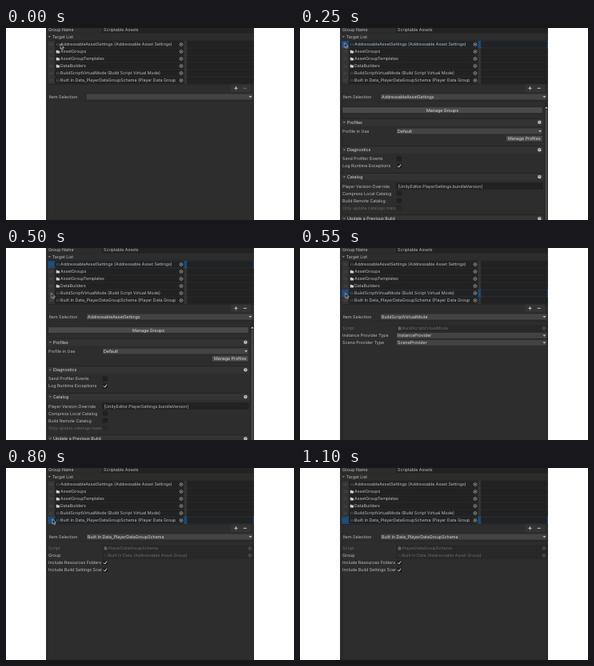
Write an HTML page that moves like this. It is 360 px wide and 240 px high and loops after 1.15 s.

```html
<!DOCTYPE html>
<html lang="en">
<head>
<meta charset="utf-8">
<title>Inspector list selection</title>
<style>
html, body { margin: 0; width: 100%; height: 100%; overflow: hidden; background: #fff; }
svg { display: block; width: 360px; height: 240px; }
text { font: 5.3px Inter, "Liberation Sans", sans-serif; fill: #bebebe; text-rendering: geometricPrecision; white-space: pre; }
.dim { opacity: .42; }
.bright { fill: #dedede; }
.mid { text-anchor: middle; }

.pick, .panel, .minus, .cursor { animation: 1150ms step-end infinite; }
.pick, .panel { visibility: hidden; }
.first { animation-name: first; }
.second { animation-name: second; }
.third { animation-name: third; }
.minus { animation-name: minus; }
.cursor { animation-name: cursor; }

/* 50 ms = 4.348% */
@keyframes first {
  0% { visibility: hidden; }
  21.739% { visibility: visible; }
  47.826%, 100% { visibility: hidden; }
}
@keyframes second {
  0% { visibility: hidden; }
  47.826% { visibility: visible; }
  69.565%, 100% { visibility: hidden; }
}
@keyframes third {
  0% { visibility: hidden; }
  69.565%, 100% { visibility: visible; }
}
@keyframes minus {
  0% { opacity: .45; }
  21.739%, 100% { opacity: 1; }
}
@keyframes cursor {
  0% { transform: translate(68px, 20px); animation-timing-function: steps(2); }
  8.696% { transform: translate(55.6px, 18.4px); }
  26.087% { transform: translate(55.6px, 18.4px); animation-timing-function: steps(4); }
  43.478% { transform: translate(56.6px, 56.4px); }
  52.174% { transform: translate(56.6px, 56.4px); animation-timing-function: steps(3); }
  65.217% { transform: translate(58px, 63.8px); }
  73.913% { transform: translate(58px, 63.8px); visibility: visible; animation-timing-function: steps(5); }
  95.652%, 100% { transform: translate(316px, 20px); visibility: hidden; }
}
</style>
</head>
<body>
<svg id="stage" viewBox="0 0 360 240"></svg>
<script>
const LINE = '#1e1e1e';
const rect = (x, y, w, h, fill, more = '') =>
  `<rect x="${x}" y="${y}" width="${w}" height="${h}" fill="${fill}" ${more}/>`;
const path = (d, fill, more = '') => `<path d="${d}" fill="${fill}" ${more}/>`;
const group = (cls, ...parts) => `<g class="${cls}">${parts.join('')}</g>`;

// Every y below is the vertical centre of a row.
const text = (x, y, s, cls = '', clip = '') =>
  `<text x="${x}" y="${y + 1.9}" class="${cls}" ${clip && `clip-path="url(#${clip})"`}>${s}</text>`;
const label = (y, s, cls) => text(53, y, s, cls, 'labelClip');
const box = (x, y, right, fill = '#222') =>
  rect(x + .25, y - 3.9, right - x - .5, 7.8, fill, `rx=".8" stroke="${LINE}" stroke-width=".5"`);
const arrow = (x, y) => path(`M${x - 2} ${y - 1}h4l-2 2.3z`, '#bbb');
const fold = (x, y) => path(`M${x - 1.7} ${y - 1}h3.4l-1.7 2.2z`, '#777');
const dropdown = (x, y, right, s) =>
  box(x, y, right, '#434343') + text(x + 2, y, s, 'bright') + arrow(right - 3.5, y);
const button = (x, y, right, s) =>
  box(x, y, right, '#4a4a4a') + text((x + right) / 2, y, s, 'mid bright');
const picker = (x, y) =>
  `<circle cx="${x}" cy="${y}" r="2" fill="none" stroke="#aaa" stroke-width=".7"/>` +
  `<circle cx="${x}" cy="${y}" r=".8" fill="#aaa"/>`;
const check = (y, on) =>
  rect(121.2, y - 2.7, 5.6, 5.4, '#202020', `rx=".6" stroke="${LINE}" stroke-width=".5"`) +
  (on ? path(`M122.1 ${y}l1.4 1.6l2.5-3.4`, 'none', 'stroke="#e4e4e4" stroke-width="1"') : '');
const toggle = (y, s, on) => label(y, s) + check(y, on);
const braces = (x, y) =>
  path(`M${x + 1.6} ${y - 1.6}q-.9 0-.7.9t-.6.7q.8 0 .6.7t.7.9m1.2-3.2q.9 0 .7.9t.6.7q-.8 0-.6.7t-.7.9`,
    'none', 'stroke="#808080" stroke-width=".5"');
const folder = (x, y) => path(`M${x} ${y - 1.8}h1.7l.6.7h2v3h-4.3z`, '#d0d0d0');
const page = (x, y) => path(`M${x} ${y - 2.2}h2.6l1.2 1.2v3.2h-3.8z`, '#aaa');
const header = (y, s) =>
  rect(52, y - 4.6, 252, 9, '#333') + rect(52, y - 5, 252, .6, LINE) +
  fold(55.3, y) + text(59, y, s, 'bright') +
  `<circle cx="299.4" cy="${y - .3}" r="2.2" fill="#ccc"/>` +
  path(`M298.6 ${y - .9}q.1-.7.8-.7t.8.7q0 .4-.8.9v.3m0 .5v.4`, 'none', 'stroke="#333" stroke-width=".55"');

const rowY = i => 20.5 + 9 * i;
const items = [
  [braces, 'AddressableAssetSettings (Addressable Asset Settings)', 'first'],
  [folder, 'AssetGroups'],
  [folder, 'AssetGroupTemplates'],
  [folder, 'DataBuilders'],
  [braces, 'BuildScriptVirtualMode (Build Script Virtual Mode)', 'second'],
  [braces, 'Built In Data_PlayerDataGroupSchema (Player Data Group', 'third']
];
const row = ([icon, name, pick], i) => {
  const y = rowY(i);
  return (pick ? rect(52, y - 4.5, 258, 9, '#1d4a7c', `class="pick ${pick}"`) : '') +
    path(`M54 ${y - .8}h5m-5 1.7h5`, 'none', 'stroke="#555" stroke-width=".5"') +
    box(61, y, 222.5) + icon(62.7, y) + text(68, y, name, '', 'rowClip') +
    picker(219, y) + box(226.2, y, 309);
};
const choice = (cls, s) => group('panel ' + cls, text(102, 86, s, 'bright'));
const objectField = (y, icon, s) =>
  group('dim', box(120, y, 309), icon(122.6, y), text(127.5, y, s), picker(305, y));

const list = [
  text(53, 2, 'Group Name'),
  box(120, 1.8, 309), text(122, 2, 'Scriptable Assets'),
  rect(50, 6.2, 260, .5, '#252525'),
  fold(54.3, 11), text(57.8, 11, 'Target List'),
  rect(51.8, 15.5, 257.8, 54.8, '#343434', `stroke="${LINE}" stroke-width=".5"`),
  ...items.map(row),
  rect(281, 70.5, 25, 9.5, '#343434', 'rx="1"'),
  path('M285.2 75.3h4.6m-2.3-2.3v4.6', 'none', 'stroke="#ccc" stroke-width=".9"'),
  path('M296.7 75.3h4.2', 'none', 'class="minus" stroke="#ccc" stroke-width=".9"'),
  text(53.7, 86, 'Item Selection'),
  dropdown(100, 86, 309, ''),
  rect(52.2, 91.5, 257, 160, 'none', 'stroke="#252525" stroke-width=".6"')
];

const settings = group('panel first',
  rect(305, 94, 5, 146, '#282828'),
  path('M306.2 100.4h3.4l-1.7-2.2z', '#ccc'),
  rect(306.6, 102, 2.6, 140, '#484848', 'rx="1.3"'),
  button(52.5, 102.6, 303.5, 'Manage Groups'),
  header(118, 'Profiles'),
  label(129, 'Profile in Use'), dropdown(120, 129, 303.5, 'Default'),
  button(257, 138.2, 303.5, 'Manage Profiles'),
  header(152.5, 'Diagnostics'),
  toggle(163.5, 'Send Profiler Events', false),
  toggle(172.5, 'Log Runtime Exceptions', true),
  header(186.3, 'Catalog'),
  label(197.6, 'Player Version Override'), box(120, 197.6, 303.5),
  text(122.4, 197.6, '[UnityEditor.PlayerSettings.bundleVersion]'),
  toggle(206.6, 'Compress Local Catalog', false),
  toggle(215.6, 'Build Remote Catalog', false),
  group('dim', toggle(224.6, 'Only update catalogs manually', false)),
  header(238.5, 'Update a Previous Build'));

const builder = group('panel second',
  label(100.4, 'Script', 'dim'), objectField(100.4, page, 'BuildScriptVirtualMode'),
  label(109.4, 'Instance Provider Type'), dropdown(120, 109.4, 309, 'InstanceProvider'),
  label(118.4, 'Scene Provider Type'), dropdown(120, 118.4, 309, 'SceneProvider'));

const schema = group('panel third',
  label(100.4, 'Script', 'dim'), objectField(100.4, page, 'PlayerDataGroupSchema'),
  label(109.4, 'Group'), objectField(109.4, braces, 'Built In Data (Addressable Asset Group)'),
  toggle(118.4, 'Include Resources Folders', true),
  toggle(127.5, 'Include Build Settings Scenes', true));

document.getElementById('stage').innerHTML = `
  <defs>
    <clipPath id="view">${rect(50, 0, 260, 240, '#000')}</clipPath>
    <clipPath id="labelClip">${rect(50, 0, 70, 240, '#000')}</clipPath>
    <clipPath id="rowClip">${rect(50, 0, 165.3, 240, '#000')}</clipPath>
  </defs>
  <g clip-path="url(#view)">
    ${rect(50, 0, 260, 240, '#2d2d2d')}
    ${list.join('')}
    ${choice('first', 'AddressableAssetSettings')}
    ${choice('second', 'BuildScriptVirtualMode')}
    ${choice('third', 'Built In Data_PlayerDataGroupSchema')}
    ${settings}${builder}${schema}
    ${path('M0 0v6.2l1.4-1.3l1 2.2l1.1-.5l-1-2.1h2z', '#111', 'class="cursor" stroke="#eee" stroke-width=".6"')}
  </g>`;
</script>
</body>
</html>
```
